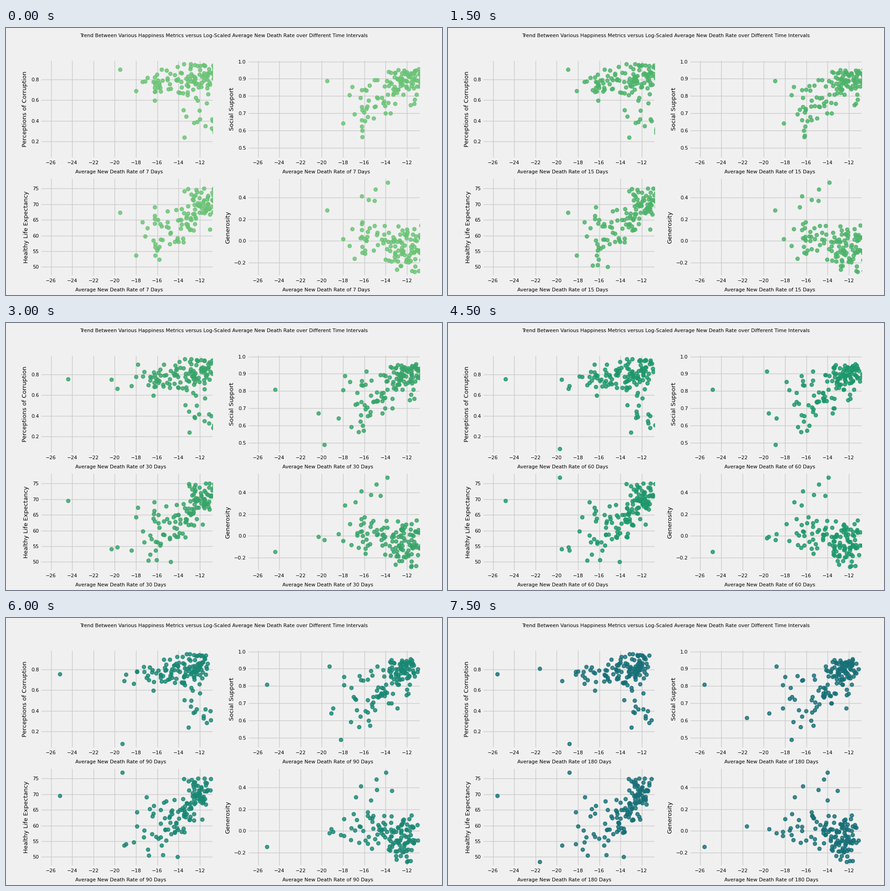
These frames come from a looping animation (956x586 px, 8000 ms). A matplotlib script:

```python
import numpy as np
import matplotlib.pyplot as plt
from matplotlib.animation import FuncAnimation

W, H, DPI = 956, 586, 78
DAYS = [7, 15, 30, 60, 90, 180]
COLORS = ["#6ac375", "#4cb369", "#37a468", "#1c976b", "#198774", "#176f77"]
STEP, HOLD = 500, 3          # ms per frame, frames per interval
EASE = np.array([0, .1, .3, .55, .75, 1])
XLIM = (-26.875, -10.81)

plt.rcParams.update({"font.family": "DejaVu Sans", "font.size": 10})

# first interval shown, x there, x at the end, then the four metrics
OUTLIERS = [
    (2, -24.4, -25.6, .755, .81, 69.6, -.145),
    (5, -21.6, -21.6, .808, .617, 48.4, .045),
    (3, -19.7, -18.8, .08, .915, 77, -.02),
    (2, -20.3, -18.2, .75, .672, 54.1, -.005),
    (2, -19.75, -17.4, .66, .49, 54.7, -.035),
    (0, -19.5, -14.0, .897, .887, 67.4, .285),
    (0, -18.0, -19.5, .69, .642, 53.7, .018),
    (0, -13.8, -14.0, .865, .81, 62.2, .54),
]


def outlier_paths():
    rows = np.array(OUTLIERS)
    x = np.full((len(rows), 6), np.nan)
    for path, (k, start, end) in zip(x, rows[:, :3]):
        k = int(k)
        span = max(1 - EASE[k], .01)
        path[k:] = start + (end - start) * (EASE[k:] - EASE[k]) / span
    return x, rows[:, 3:]


def cloud(rng, poor=42, rich=84):
    """Seeded bulk of the data: a loose left group and a tight right one."""
    n = poor + rich
    first = np.r_[np.clip(rng.normal(-15.7, .9, poor), -17.8, -14),
                  -14.6 + 4.1 * rng.beta(1.4, 1.1, rich)]
    last = np.r_[first[:poor] + rng.normal(.3, 1.1, poor),
                 np.interp(first[poor:], [-14.6, -10.5], [-14.2, -11.4])
                 + rng.normal(0, .3, rich)]
    last = np.clip(last, -18.2, -11.1)
    x = first[:, None] + (last - first)[:, None] * EASE
    x[:, 1:5] += rng.normal(0, .15, (n, 4))
    enter = np.r_[rng.integers(-9, 5, poor), np.zeros(rich, int)]
    x[np.arange(6) < enter[:, None]] = np.nan

    def trend(values, spread, low, high):
        mean = np.interp(first, [-16, -14, -12], values)
        sd = np.interp(first, [-16, -12], spread)
        return np.clip(rng.normal(mean, sd), low, high - rng.uniform(0, .03, n))

    corruption = trend([.76, .78, .83], [.06, .085], .58, .95)
    support = trend([.725, .825, .905], [.09, .05], .465, .962)
    life = trend([58.5, 65, 69.4], [4.6, 3], 50, 75)
    giving = trend([.02, -.02, -.08], [.085, .095], -.285, .2)

    # long tails: low corruption on the right, high generosity on the left
    low = (first > -14.6) & (rng.random(n) < .2)
    corruption[low] = rng.uniform(.17, .6, low.sum())
    high = (first < -14.4) & (rng.random(n) < .12)
    giving[high] = rng.uniform(.2, .5, high.sum())
    return x, np.c_[corruption, support, life, giving]


parts = [cloud(np.random.default_rng(12)), outlier_paths()]
X, Y = (np.vstack(p) for p in zip(*parts))

fig = plt.figure(figsize=(W / DPI, H / DPI), dpi=DPI, facecolor="#f0f0f0")
fig.text(.5, 1 - 16.5 / H, "Trend Between Various Happiness Metrics versus "
         "Log-Scaled Average New Death Rate over Different Time Intervals",
         ha="center", va="center")


def panel(left, top, name, name_x, ylim, ticks, fmt):
    ax = fig.add_axes([left / W, 1 - (top + 212) / H, 374.3 / W, 212 / H])
    ax.set(xlim=XLIM, ylim=ylim, facecolor="#f0f0f0",
           xticks=range(-26, -11, 2), yticks=ticks)
    ax.yaxis.set_major_formatter(lambda v, _: fmt.format(v).replace("-", "\u2212"))
    ax.spines[:].set_visible(False)
    ax.set_axisbelow(True)
    ax.grid(color="#cbcbcb", lw=1.3)
    ax.tick_params(length=0)
    ax.tick_params(axis="x", pad=6.5)
    ax.tick_params(axis="y", pad=5.5)
    fig.text(name_x / W, 1 - (top + 106) / H, name, size=12,
             rotation=90, ha="center", va="center")
    label = fig.text((left + 73.6) / W, 1 - (top + 247) / H, "", va="baseline")
    dots = ax.scatter([], [], s=50, lw=1.8, alpha=.8)
    return dots, label


panels = [
    panel(78.3, 72, "Perceptions of Corruption", 41, (.046, .9785),
          np.arange(.2, .9, .2), "{:.1f}"),
    panel(532.3, 72, "Social Support", 495, (.4446, 1.004),
          np.arange(.5, 1.01, .1), "{:.1f}"),
    panel(78.3, 331, "Healthy Life Expectancy", 45, (47.3, 78.1),
          np.arange(50, 76, 5), "{:.0f}"),
    panel(532.3, 331, "Generosity", 487, (-.319, .575),
          [-.2, 0, .2, .4], "{:.1f}"),
]


def draw(i):
    k = i // HOLD
    seen = ~np.isnan(X[:, k])
    for j, (dots, label) in enumerate(panels):
        dots.set_offsets(np.c_[X[seen, k], Y[seen, j]])
        dots.set_color(COLORS[k])
        label.set_text(f"Average New Death Rate of {DAYS[k]} Days")
    return []


anim = FuncAnimation(fig, draw, frames=16, interval=STEP, repeat=True)
plt.show()
```
